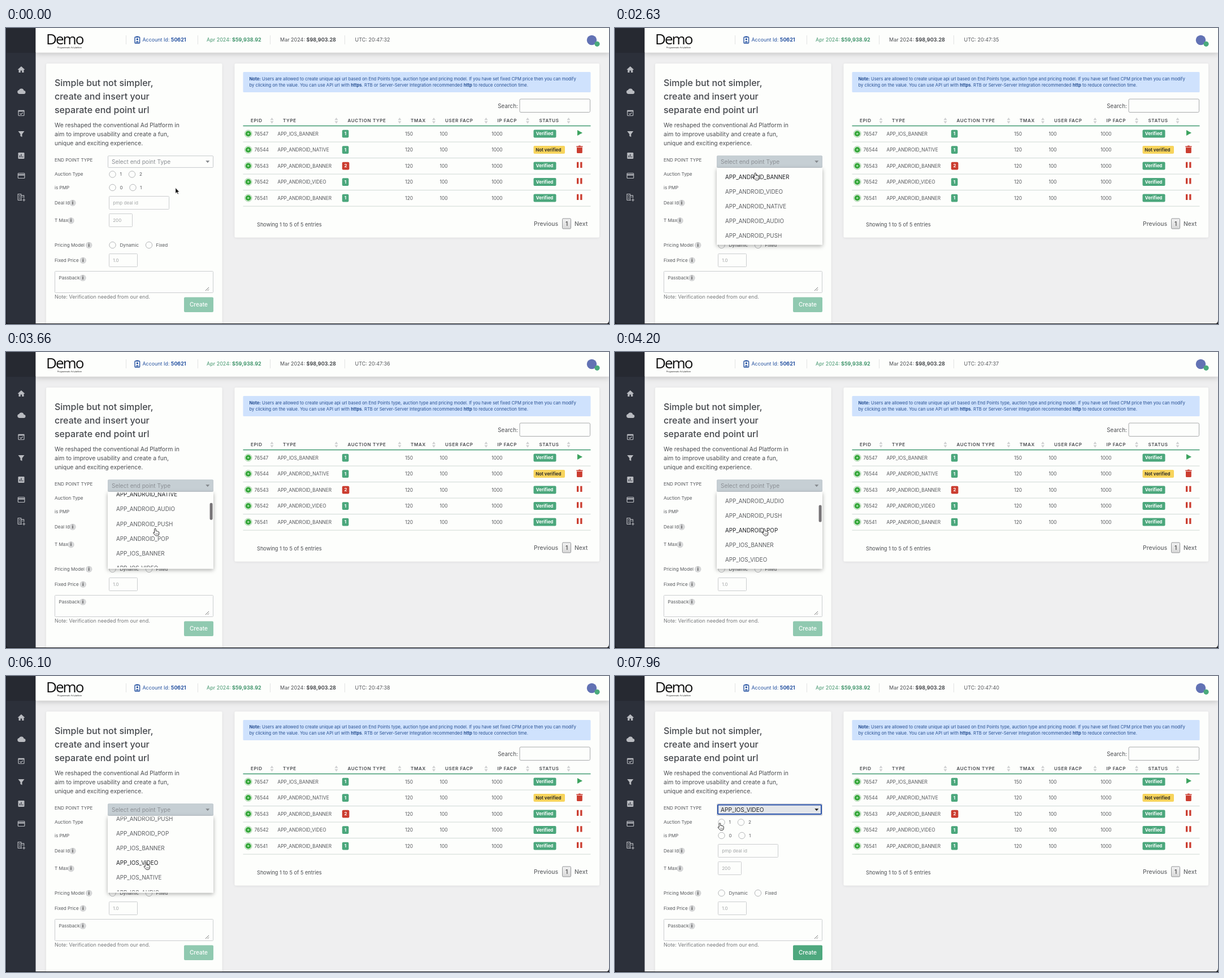
An HTML page that plays this animation: 1067x525 px, repeating every 8000 ms.

```html
<!DOCTYPE html>
<html lang="en">
<head>
<meta charset="utf-8">
<title>End point form</title>
<style>
html, body { margin: 0; width: 100%; height: 100%; overflow: hidden; background: #efeff0; }
svg { display: block; width: 100vw; height: 100vh; }
text { font-family: Inter, Roboto, sans-serif; font-optical-sizing: none; white-space: pre; }
</style>
</head>
<body>
<svg id="stage" viewBox="0 0 1067 525" preserveAspectRatio="none">
<defs>
  <filter id="soft" x="-20%" y="-20%" width="140%" height="140%">
    <feDropShadow dx="0" dy="2.5" stdDeviation="3.8" flood-color="#000" flood-opacity=".32"/>
  </filter>
  <filter id="faint" x="-5%" y="-10%" width="110%" height="130%">
    <feDropShadow dx="0" dy="1" stdDeviation="2" flood-color="#000" flood-opacity=".08"/>
  </filter>
  <filter id="bar" x="-5%" y="-10%" width="110%" height="170%">
    <feDropShadow dx="0" dy="3" stdDeviation="5" flood-color="#000" flood-opacity=".17"/>
  </filter>
  <linearGradient id="page" x1="0" y1="0" x2="0" y2="1">
    <stop offset="0" stop-color="#f2f2f2"/><stop offset="1" stop-color="#d8d8d8"/>
  </linearGradient>
  <clipPath id="listClip"><rect x="180" y="249.5" width="187" height="132.5"/></clipPath>
</defs>
</svg>
<script>
const LOOP = 8000, ROW = 26.15;
const GREEN = '#4ba77c', RED = '#cb3d30', BLUE = '#2350a0', CARD = '#fdfefc';
const stage = document.getElementById('stage');

function el(tag, attrs, parent = stage) {
  const node = document.createElementNS('http://www.w3.org/2000/svg', tag);
  for (const key in attrs) node.setAttribute(key, attrs[key]);
  parent.appendChild(node);
  return node;
}
const rect = (x, y, width, height, fill, more, parent) =>
  el('rect', { x, y, width, height, fill, ...more }, parent);
const path = (d, more, parent) => el('path', { d, ...more }, parent);
const circle = (cx, cy, r, more, parent) => el('circle', { cx, cy, r, ...more }, parent);
// y is the middle of the capitals; *stars* mark bold runs
function label(x, y, size, words, fill = '#55575b', more = {}, parent = stage) {
  const node = el('text', { x, y: y + size * 0.363, 'font-size': size, fill, ...more }, parent);
  words.split('*').forEach((run, i) => {
    if (run) el('tspan', i % 2 ? { 'font-weight': 700 } : {}, node).textContent = run;
  });
  return node;
}
const box = (x, y, w, h, parent) =>
  rect(x, y, w, h, CARD, { stroke: '#cbcdcf', rx: 1 }, parent);

function drawSidebar() {
  rect(0, 0, 52.5, 525, '#2c303a');
  rect(0, 0, 52.5, 44, '#262931');
  rect(0, 0, 1, 525, '#1d2028');
  const ink = '#b9bbc0', line = { fill: 'none', stroke: ink, 'stroke-width': 1.2 };
  path('M20.5 74 27 68l6.5 6h-2v5h-3.2v-3.6h-2.6V79h-3.2v-5z', { fill: ink });
  path('M23.5 117a3.6 3.6 0 0 1-.4-7.1 4.6 4.6 0 0 1 8.5 1.1 3 3 0 0 1-.1 6z', { fill: ink });
  rect(22, 146.5, 10, 9, 'none', { ...line, rx: 1 });
  rect(21.6, 145.7, 10.8, 2.6, ink);
  path('M24.7 151.7l1.8 1.7 3.2-3.2', line);
  path('M21.5 183h11l-4 5.3v5l-3-1.6v-3.4z', { fill: ink });
  rect(21.5, 221, 11, 11, ink, { rx: 1.2 });
  path('M24.4 229.5v-3.5M27 229.5v-6M29.6 229.5v-2', { stroke: '#2c303a', 'stroke-width': 1.2 });
  rect(21.3, 257.5, 11.6, 9, 'none', { ...line, rx: 1 });
  rect(21.3, 259.2, 11.6, 2.4, ink);
  path('M21.2 305.5v-11h5.5v2.6h5v4.4M21.2 305.5h7M26.7 297v8M23 297.2h2M23 300h2M23 302.8h2M28.5 300h1.6M31.7 302.5v5M29.2 305h5', line);
}

function drawHeader() {
  rect(52.5, 0, 1015, 43.5, CARD, { filter: 'url(#bar)' });
  label(71, 19.3, 26, 'Demo', '#101010',
    { 'font-weight': 500, 'letter-spacing': -2, style: 'font-family:"Open Sans","Noto Sans",sans-serif' });
  label(91, 34.4, 3.5, 'Programmatic Ad platform', '#222');
  for (const x of [212.5, 339.5, 467.5, 599.5]) rect(x - 0.5, 13, 1, 16, '#e2e3e3');
  rect(228, 16, 8.6, 11, 'none', { rx: 1, stroke: BLUE, 'stroke-width': 1.4 });
  circle(232.3, 20, 1.7, { fill: BLUE });
  path('M229.3 25.5q3-4.4 6 0z', { fill: BLUE });
  rect(230.3, 14.6, 4, 1.8, BLUE);
  label(241.5, 21, 8.9, 'Account Id: *50621*', BLUE);
  label(355, 21, 9, 'Apr 2024: *$59,938.92*', '#45976f');
  label(485, 21, 9, 'Mar 2024: *$98,903.28*', '#4b4d51');
  circle(1036.5, 21.5, 8.7, { fill: '#6272b4' });
  circle(1046, 28.3, 4.6, { fill: '#4aaa7c' });
  return label(617.5, 21, 9, ' ', '#55575b').firstChild;
}

function info(x, y) {
  circle(x, y, 5.8, { fill: '#d5d6d7' });
  label(x, y, 7.4, '*i*', '#333', { 'text-anchor': 'middle' });
}
function radio(x, y, words, gap = 13) {
  circle(x, y, 5.7, { fill: CARD, stroke: '#b4b6b8' });
  label(x + gap, y, 8.15, words);
}
function field(x, y, w, hint) {
  box(x, y, w, 23);
  label(x + 6.7, y + 11.6, 8.1, hint, '#a3a5a7');
}

function drawForm() {
  rect(71, 63, 311.5, 470, CARD, { rx: 2, filter: 'url(#faint)' });
  ['Simple but not simpler,', 'create and insert your', 'separate end point url'].forEach((s, i) =>
    label(86, 97.5 + 24 * i, 16, s, '#45484d', { 'font-weight': 500 }));
  ['We reshaped the conventional Ad Platform in', 'aim to improve usability and create a fun,',
    'unique and exciting experience.'].forEach((s, i) => label(86, 172.7 + 15.6 * i, 10.4, s, '#494b4f'));
  label(86, 234.5, 8.15, 'END POINT TYPE');
  label(86, 259.5, 8.1, 'Auction Type');
  radio(188.5, 259.5, '1');
  radio(223, 259.5, '2');
  label(86, 283, 8.15, 'is PMP');
  radio(188.5, 283, '0');
  radio(224.5, 283, '1', 12.5);
  label(86, 310, 8.15, 'Deal Id');
  info(118, 310.2);
  field(182.5, 298.5, 106, 'pmp deal id');
  label(86, 341.5, 8.15, 'T Max');
  info(115, 341.7);
  field(182.5, 329.5, 41, '200');
  label(86, 385, 8.15, 'Pricing Model');
  info(146.7, 385.2);
  radio(188.5, 385, 'Dynamic');
  radio(253, 385, 'Fixed', 12.5);
  label(86, 412, 8.15, 'Fixed Price');
  info(136.3, 412.2);
  field(182.5, 400.5, 50, '1.0');
  box(86.5, 431.5, 280, 38);
  label(93.5, 443, 8.1, 'Passback');
  info(136, 443.3);
  path('M353 466l6-6M356.5 466l2.5-2.5', { stroke: '#666', 'stroke-width': 0.9 });
  label(86, 476.8, 9.02, 'Note: Verification needed from our end.', '#77797c');
  const button = rect(315, 477.5, 52, 26.5, '#90c9b0', { rx: 2 });
  label(325, 490.8, 10, 'Create', '#fff', { 'font-weight': 500 });
  return button;
}

function drawTable() {
  rect(404.5, 63, 645.5, 308.5, CARD, { rx: 2, filter: 'url(#faint)' });
  rect(419.5, 78, 615, 36, '#cfe2fd', { rx: 1.5 });
  label(430.5, 90, 7.68, '*Note:* Users are allowed to create unique api url based on End Points type, auction type and pricing model. If you have set fixed CPM price then you can modify', '#264f92');
  label(430.5, 101.2, 7.68, 'by clicking on the value. You can use API url with *https*. RTB or Server-Server Integration recommended *http* to reduce connection time.', '#264f92');
  label(870.3, 138, 9.85, 'Search:', '#4b4d51');
  rect(909, 126, 124.5, 23.5, CARD, { rx: 2, stroke: '#a8aaac' });

  const heads = { EPID: 433, TYPE: 490, 'AUCTION TYPE': 604.5, TMAX: 716, 'USER FACP': 777, 'IP FACP': 869.5, STATUS: 943.5 };
  for (const name in heads)
    label(heads[name], 164.3, 8, name, '#484a4e', { 'font-weight': 600, 'letter-spacing': 0.65 });
  for (const x of [470.5, 584.5, 696.5, 757, 849.5, 923, 995.5])
    path(`M${x - 3} 163.2l3-4.2 3 4.2zM${x - 3} 165.2l3 4.2 3-4.2z`, { fill: '#cfd0d1' });
  rect(419.5, 172.8, 615, 1.5, '#3f9a70');

  const rows = [
    ['76547', 'APP_IOS_BANNER', 1, '150', 'play'],
    ['76544', 'APP_ANDROID_NATIVE', 1, '120', 'trash'],
    ['76543', 'APP_ANDROID_BANNER', 2, '120', 'pause'],
    ['76542', 'APP_ANDROID_VIDEO', 1, '120', 'pause'],
    ['76541', 'APP_ANDROID_BANNER', 1, '120', 'pause']];
  rows.forEach(([id, type, auction, tmax, action], i) => {
    const y = 187.5 + 28.5 * i;
    rect(419.5, y + 14.1, 615, 1, '#cfd9d5');
    circle(428.7, y, 6.4, { fill: '#fff', stroke: '#83bf85', 'stroke-width': 0.8 });
    circle(428.7, y, 5.1, { fill: '#37a83c' });
    path(`M426.9 ${y}h3.6M428.7 ${y - 1.8}v3.6`, { stroke: '#d8f3d9', 'stroke-width': 0.9 });
    label(439.5, y, 8.35, id);
    label(480.5, y, 8.3, type);
    rect(594.8, y - 6.8, auction > 1 ? 12.6 : 11.6, 13.8, auction > 1 ? RED : GREEN, { rx: 2 });
    label(auction > 1 ? 601.1 : 600.6, y, 8, `*${auction}*`, '#fff', { 'text-anchor': 'middle' });
    label(706.3, y, 8.35, tmax);
    label(767.5, y, 8.35, '100');
    label(859.3, y, 8.35, '1000');
    const wait = action === 'trash';
    rect(933.5, y - 7, wait ? 55.5 : 40, 14, wait ? '#f7d45c' : GREEN, { rx: 2 });
    label(wait ? 937.2 : 937.8, y, 7.9, wait ? '*Not verified*' : '*Verified*', wait ? '#35332b' : '#fff');
    if (action === 'play') path(`M1011 ${y - 6.5}l9 5-9 5z`, { fill: '#3da35f' });
    if (action === 'pause') path(`M1010 ${y - 6.8}h3.3v10.4h-3.3zM1016.2 ${y - 6.8}h3.3v10.4h-3.3z`, { fill: RED });
    if (wait) path(`M1009.3 ${y - 6.6}h3.4l.8-1h2.8l.8 1h3.4v1.8h-11.2zM1010 ${y - 4}h9.8v8.4q0 1.5-1.5 1.5h-6.8q-1.5 0-1.5-1.5z`, { fill: RED });
  });
  label(444, 348.5, 9.2, 'Showing 1 to 5 of 5 entries', '#4b4d51');
  label(934, 347.3, 10.4, 'Previous', '#66686b', { 'font-weight': 500 });
  rect(984.5, 338, 15, 18, 'url(#page)', { rx: 1.5, stroke: '#929497' });
  label(992, 347.2, 10.2, '1', '#444', { 'text-anchor': 'middle', 'font-weight': 500 });
  label(1006, 347.3, 10.4, 'Next', '#66686b', { 'font-weight': 500 });
}

drawSidebar();
const clock = drawHeader();
const createButton = drawForm();
drawTable();

const select = rect(180.5, 226.8, 186, 20.6, CARD, { rx: 1 });
const ring = rect(182, 228.5, 183, 16.6, 'none', { stroke: '#2f57ae', 'stroke-width': 2, rx: 1 });
const choice = label(187, 237.2, 10.15, ' ').firstChild;
const caret = path('M353.3 235.3h7l-3.5 3.9z');

const menu = el('g', {});
rect(180, 248, 187, 136.3, CARD, { filter: 'url(#soft)' }, menu);
const clip = el('g', { 'clip-path': 'url(#listClip)' }, menu);
const list = el('g', {}, clip);
const kinds = ['BANNER', 'VIDEO', 'NATIVE', 'AUDIO', 'PUSH', 'POP'];
const items = ['ANDROID', 'IOS'].flatMap(os => kinds.map(kind => `APP_${os}_${kind}`))
  .map((name, i) => label(195, 264.2 + ROW * i, 9.83, name, '#5b5d61', {}, list));
const thumb = rect(360.6, 251, 5, 30, '#777477', { rx: 2.2 }, menu);

const arrow = path('M0 0V10.3L2.4 8.2 4 11.8 5.7 11 4.1 7.6H7.3Z',
  { fill: '#111', stroke: '#fff', 'stroke-width': 0.8, 'stroke-linejoin': 'round' });
const hand = el('g', {});
path('M-1.3 1Q-1.3-.3 0-.3T1.3 1V4.2Q2.6 3.6 3.3 4.6 4.6 4.1 5.2 5.1 6.8 4.9 6.8 6.6V9Q6.8 12.5 3.6 12.5H2Q.4 12.5-.8 10.6L-3.2 7.6Q-3.6 6.4-2.2 6.4L-1.3 7.2Z',
  { fill: '#fff', stroke: '#222', 'stroke-width': 0.95, 'stroke-linejoin': 'round' }, hand);
path('M1.2 8v2.4M3 8v2.4M4.8 8v2.4', { stroke: '#333', 'stroke-width': 0.6 }, hand);

// window edge
rect(0, 524, 1067, 1, '#1c1d20');
path('M0 518v7h7q-7 0-7-7zM1067 518v7h-7q7 0 7-7z', { fill: '#16171a' });

const clamp = v => Math.min(1, Math.max(0, v));
const smooth = p => p * p * (3 - 2 * p);
const span = (t, a, b) => clamp((t - a) / (b - a));
const mix = (a, b, p) => a + (b - a) * p;

// [start, end, x, y]
const moves = [[30, 800, 242.5, 237], [2360, 3160, 264, 313.5], [5080, 5950, 247.5, 331], [6930, 7780, 185.5, 261.2]];
function pointer(t) {
  let x = 299.8, y = 283.3;
  for (const [a, b, tx, ty] of moves) {
    const p = smooth(span(t, a, b));
    x = mix(x, tx, p);
    y = mix(y, ty, p);
  }
  return [x, y];
}
function scrollAt(t) {
  const out = 1 - (1 - span(t, 3400, 3960)) ** 2;
  return 27 * span(t, 3330, 3400) + 51.4 * out + 37.2 * smooth(span(t, 4340, 4760));
}
// the highlight lags behind while the list scrolls
function hovered(t, y, scroll) {
  if (t >= 3330 && t < 4160) return 2;
  if (t >= 4160 && t < 4960) return 5;
  return y < 251 ? -1 : Math.floor((y + scroll - 251) / ROW);
}

function draw(t) {
  const [x, y] = pointer(t), scroll = scrollAt(t);
  const open = t >= 1530 && t < 6300, grey = t >= 1600 && t < 6300, done = t >= 6300;
  clock.textContent = `UTC: 20:47:${33 + Math.floor((t - 160) / 1000)}`;

  select.setAttribute('fill', grey ? '#c6cfd4' : done ? '#e3e6ea' : CARD);
  select.setAttribute('stroke', grey ? '#bfc8cd' : '#c6c9cc');
  ring.setAttribute('visibility', done ? 'visible' : 'hidden');
  choice.textContent = done ? 'APP_IOS_VIDEO' : 'Select end point Type';
  choice.setAttribute('fill', done ? '#26282c' : '#8b8f94');
  caret.setAttribute('fill', done ? '#222' : '#84888c');

  menu.setAttribute('visibility', open ? 'visible' : 'hidden');
  list.setAttribute('transform', `translate(0 ${-scroll})`);
  const hot = hovered(t, y, scroll);
  items.forEach((item, i) => item.setAttribute('fill', i === hot ? '#1d1f23' : '#5b5d61'));
  thumb.setAttribute('y', 251 + 0.263 * scroll);
  thumb.setAttribute('opacity', span(t, 3320, 3380) * (1 - span(t, 5250, 5500)));

  const p = span(t, 6300, 6400);
  createButton.setAttribute('fill', `rgb(${[[144, 78], [201, 168], [176, 126]].map(([a, b]) => Math.round(mix(a, b, p)))})`);

  const pointing = t < 6400 ? y < 248 || t > 1530 : y < 266;
  const place = `translate(${x} ${y})`;
  arrow.setAttribute('transform', place);
  hand.setAttribute('transform', place);
  arrow.setAttribute('visibility', pointing ? 'hidden' : 'visible');
  hand.setAttribute('visibility', pointing ? 'visible' : 'hidden');
}

const start = performance.now();
function frame() {
  draw((performance.now() - start) % LOOP);
  requestAnimationFrame(frame);
}
draw(0);
requestAnimationFrame(frame);
</script>
</body>
</html>
```
